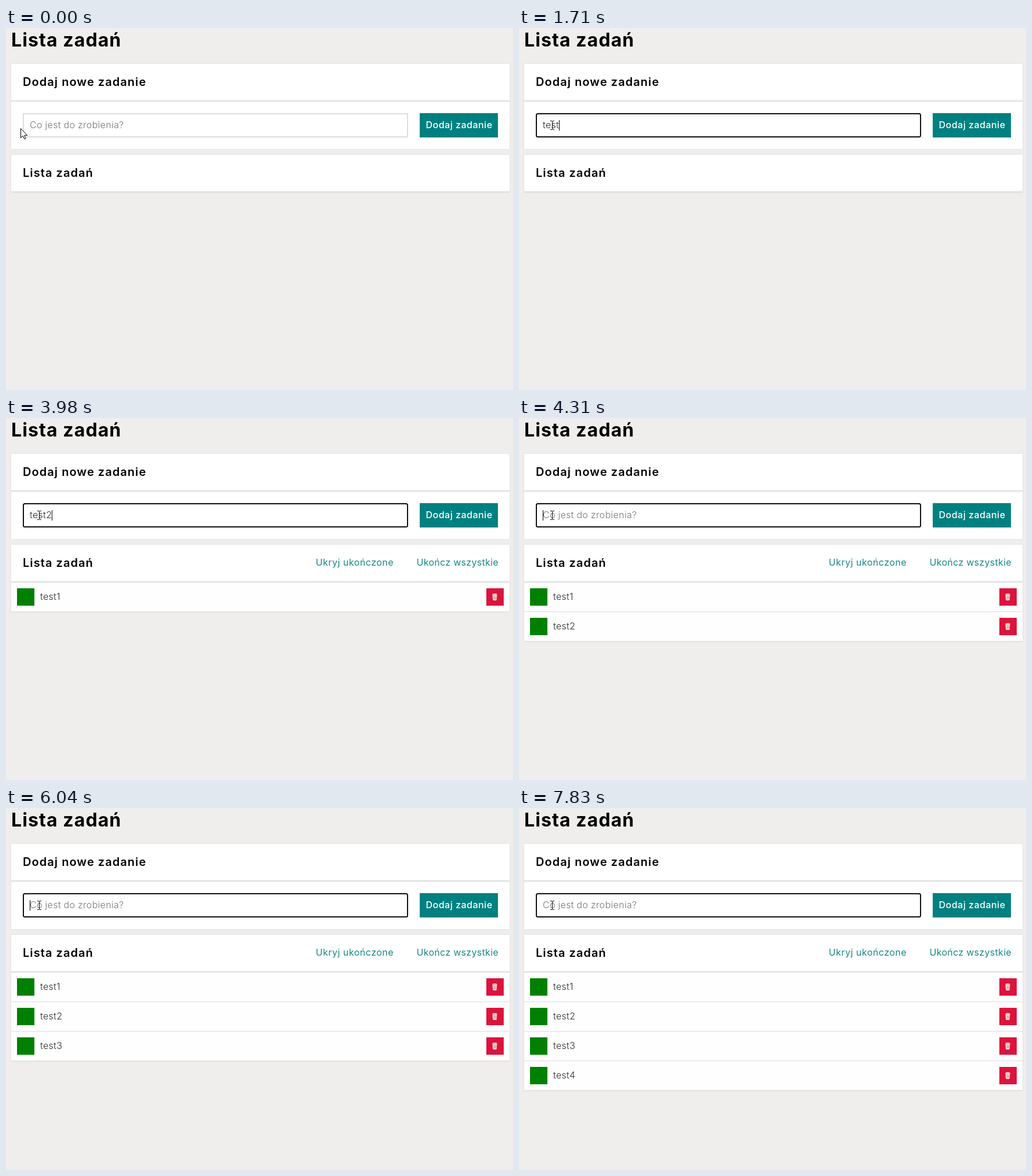
An HTML page for the animation above (8000 ms loop, 875 by 625 pixels).

```html
<!DOCTYPE html>
<html lang="pl">
<head>
<meta charset="utf-8">
<title>Lista zadań</title>
<style>
  html, body { margin: 0; width: 100%; height: 100%; overflow: hidden; background: #efeeed; }
  svg { display: block; width: 875px; height: 625px; }
  text { font: 400 16px Inter, "Open Sans", sans-serif; font-optical-sizing: none; letter-spacing: .3px; white-space: pre; }
  .title { font-size: 32px; font-weight: 700; letter-spacing: 1.1px; }
  .heading { font-size: 20px; font-weight: 600; letter-spacing: 1.05px; }
  .short { letter-spacing: .5px; }
  .button { font-weight: 500; letter-spacing: .5px; fill: #fff; }
  .link { fill: #178787; }
  .ink { font-weight: 350; fill: #2c2c2c; }
  .hint { font-weight: 350; fill: #757575; }
  .panel { fill: #fff; filter: drop-shadow(0 0 1.5px #ddd); }
  .line { fill: #ddd; }
  #field { fill: #fff; stroke: #ddd; stroke-width: 2; }
  #field.focused { stroke: #101010; }
  #beam, #caret { shape-rendering: crispEdges; }
</style>
</head>
<body>
<svg viewBox="0 0 875 625">
  <defs>
    <g id="bin">
      <path d="M10.5 10.5q0-1.5 4-1.5t4 1.5l-.7 9.5q-.3 1-3.3 1t-3.3-1z" fill="#f7e6e3"/>
      <path d="M10.8 11h7.4M13 13l.3 6M15 13v6M17 13l-.3 6" fill="none" stroke="#b5666c" stroke-width=".7"/>
    </g>
  </defs>

  <text class="title" x="9" y="32">Lista zadań</text>

  <rect class="panel" x="9" y="62" width="860" height="147"/>
  <rect class="line" x="9" y="125" width="860" height="2"/>
  <text class="heading" x="29" y="100">Dodaj nowe zadanie</text>
  <rect id="field" x="30" y="148" width="663" height="40"/>
  <text id="hint" class="hint" x="41" y="173">Co jest do zrobienia?</text>
  <text id="typed" class="ink" x="41" y="173"></text>
  <rect id="caret" y="159" width="1" height="18"/>
  <rect x="714" y="147" width="135" height="42" fill="teal"/>
  <text class="button" x="724.5" y="173">Dodaj zadanie</text>

  <rect id="list" class="panel" x="9" y="219" width="860" height="65"/>
  <rect class="line" x="9" y="282" width="860" height="2"/>
  <text class="heading" x="29" y="257">Lista zadań</text>
  <g id="links">
    <text class="link short" x="534.5" y="255">Ukryj ukończone</text>
    <text class="link" x="708.5" y="255">Ukończ wszystkie</text>
  </g>
  <g id="rows"></g>

  <path id="arrow" d="M.5.5v16.2l3.7-3.5 2.6 5.5 2.3-1-2.5-5.4h5.1z" fill="#fff" stroke="#000"/>
  <path id="beam" d="M-3-8h3v1h1v-1h3v1h-3v14h3v1h-3v-1h-1v1h-3v-1h3v-14h-3z"/>
</svg>
<script>
const LOOP = 8000, FOCUS_AT = 400, ROW = 51;

// time, typed text, caret shown, number of tasks
const steps = [
  [0, "", 0, 0], [FOCUS_AT, "", 1, 0], [910, "", 0, 0],
  [1250, "t", 1, 0], [1380, "te", 1, 0], [1580, "tes", 1, 0], [1710, "test", 1, 0], [2310, "test1", 1, 0],
  [2640, "", 1, 1], [2840, "", 0, 1],
  [3110, "t", 1, 1], [3240, "te", 1, 1], [3510, "tes", 1, 1], [3640, "test", 1, 1], [3980, "test2", 1, 1],
  [4310, "", 1, 2], [4510, "", 0, 2],
  [4780, "t", 1, 2], [4910, "te", 1, 2], [5040, "tes", 1, 2], [5250, "test", 1, 2], [5580, "test3", 1, 2],
  [6040, "", 1, 3], [6100, "", 0, 3],
  [6510, "t", 1, 3], [6640, "te", 1, 3], [6840, "tes", 1, 3], [6970, "test", 1, 3], [7300, "test4", 1, 3],
  [7700, "", 1, 4], [7830, "", 0, 4]
];

// time, x, y of the pointer
const moves = [
  [0, 25, 173], [70, 34, 172], [130, 41, 171], [200, 47, 170],
  [270, 51, 169], [330, 54, 168], [520, 56, 168], [780, 57, 168]
];

const $ = id => document.getElementById(id);
const show = (el, on) => el.setAttribute("visibility", on ? "visible" : "hidden");
const place = (el, x, y) => el.setAttribute("transform", `translate(${x} ${y})`);
const at = (table, time) => table.findLast(row => row[0] <= time);

$("rows").innerHTML = [1, 2, 3, 4].map(n => `
  <g transform="translate(0 ${284 + (n - 1) * ROW})">
    <rect x="9" width="860" height="50" fill="#fefefe"/>
    <rect class="line" x="9" y="50" width="860" height="1"/>
    <rect x="19" y="10" width="30" height="30" fill="green"/>
    <text class="ink" x="59" y="30">test${n}</text>
    <rect x="829" y="10" width="30" height="30" fill="crimson"/>
    <use href="#bin" x="829" y="10"/>
  </g>`).join("");

function draw(time) {
  const [, typed, caret, tasks] = at(steps, time);
  const [, x, y] = at(moves, time);
  const focused = time >= FOCUS_AT;

  $("field").classList.toggle("focused", focused);
  $("field").setAttribute("rx", focused ? 2.5 : 0);
  $("typed").textContent = typed;
  show($("hint"), !typed);
  show($("caret"), caret);
  const width = typed ? $("typed").getComputedTextLength() : 0;
  $("caret").setAttribute("x", Math.floor(41 + width));

  $("list").setAttribute("height", 65 + tasks * ROW);
  show($("links"), tasks);
  [...$("rows").children].forEach((row, i) => show(row, i < tasks));

  const outside = x < 29;
  show($("arrow"), outside);
  show($("beam"), !outside);
  place(outside ? $("arrow") : $("beam"), x, y);
}

const start = performance.now();
function tick() {
  draw((performance.now() - start) % LOOP);
  requestAnimationFrame(tick);
}
tick();
</script>
</body>
</html>
```
